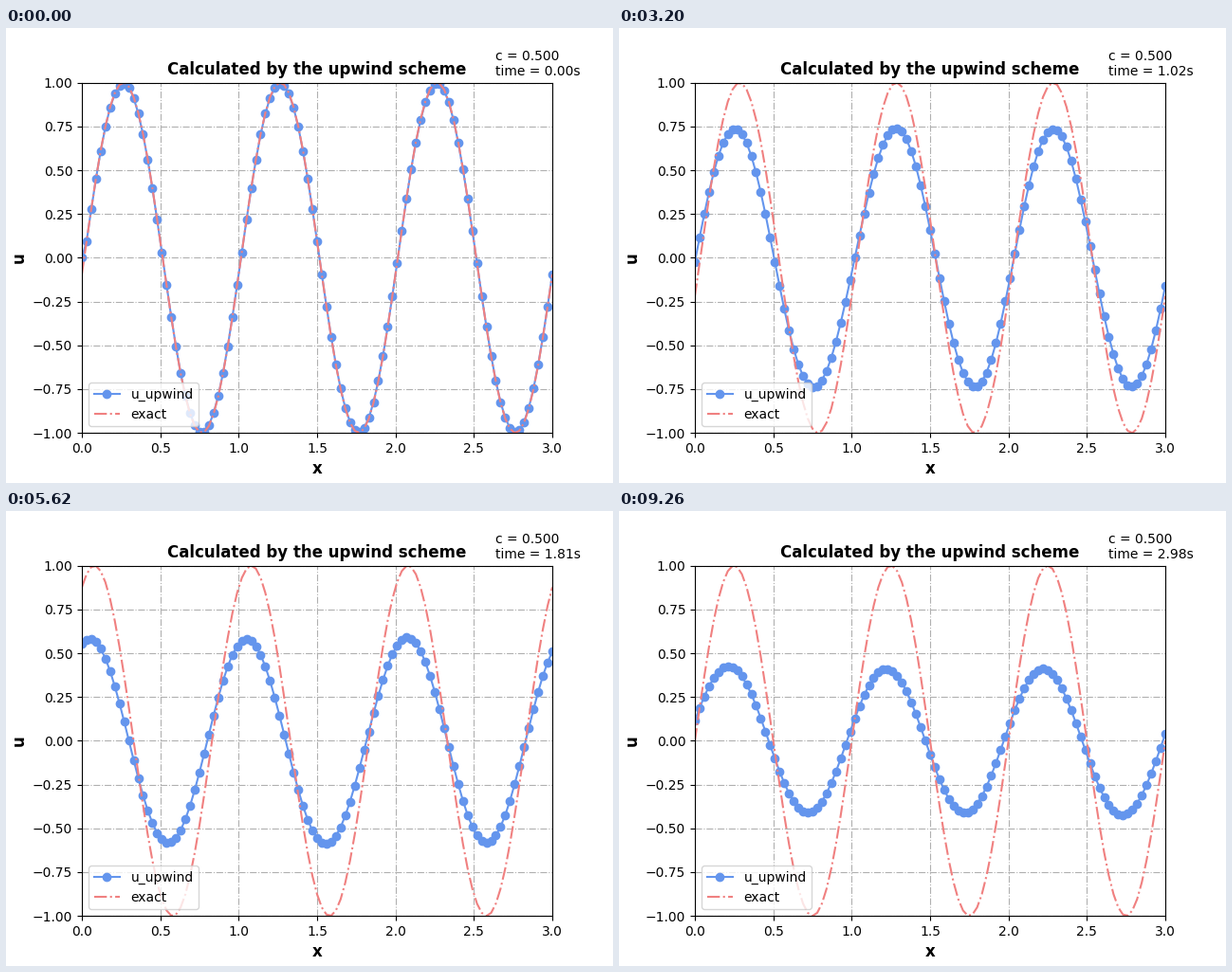
A matplotlib script that plays this animation: 640 px wide and 480 px high, repeating every 9280 ms.

```python
import matplotlib.pyplot as plt
import numpy as np
from matplotlib.animation import FuncAnimation

C = 0.5            # Courant number
DX = 0.03
DT = C * DX
STEPS = 200
TICK = 20          # ms
TICKS = 464

x = np.linspace(0, 3, 101)


def wave(t):
    return np.sin(2 * np.pi * (x - t))


def solve():
    """Upwind solution on a periodic grid, one row per time step."""
    u, rows = wave(0), []
    for _ in range(STEPS):
        u = u - C * (u - np.roll(u, 1))
        rows.append(u)
    return rows


def step_at(tick):
    """Every three steps are held for 1, 5 and 1 ticks."""
    cycle, slot = divmod(tick, 7)
    return 3 * cycle + (slot > 0) + (slot > 5)


upwind = solve()

fig, ax = plt.subplots(figsize=(6.4, 4.8), dpi=100)
ax.set_xlim(0, 3)
ax.set_ylim(-1, 1)
ax.set_title("Calculated by the upwind scheme", fontsize=12, fontweight="bold")
ax.set_xlabel("x", fontsize=12, fontweight="bold")
ax.set_ylabel("u", fontsize=12, fontweight="bold")
ax.grid(linestyle="-.")

numeric, = ax.plot(x, upwind[0], "o-", color="cornflowerblue", label="u_upwind")
exact, = ax.plot(x, wave(DT), "-.", color="lightcoral", label="exact")
info = ax.text(0.88, 1.02, "", transform=ax.transAxes)
ax.legend(loc="lower left")


def update(tick):
    n = step_at(tick)
    numeric.set_ydata(upwind[n])
    exact.set_ydata(wave((n + 1) * DT))
    info.set_text(f"c = {C:.3f}\ntime = {n * DT:.2f}s")
    return numeric, exact, info


anim = FuncAnimation(fig, update, frames=TICKS, interval=TICK,
                     repeat=True, repeat_delay=0)
plt.show()
```
